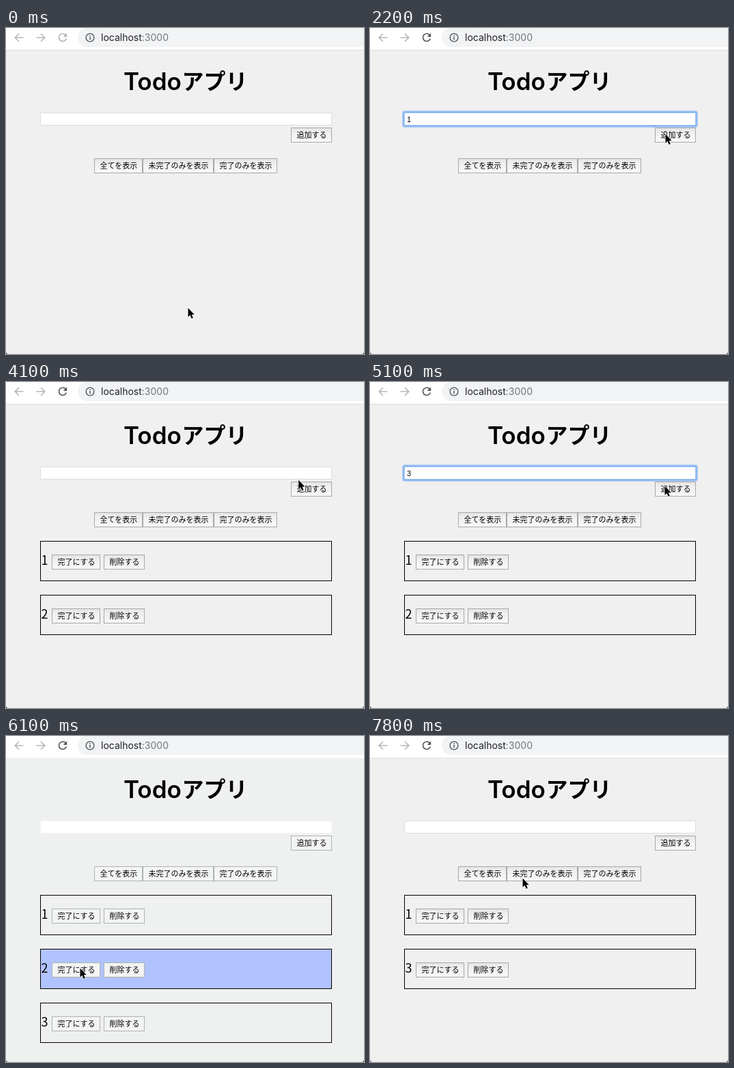
An HTML page that plays this animation: 524x478 px, repeating every 8 s.

```html
<!DOCTYPE html>
<html lang="ja">
<head>
<meta charset="utf-8">
<title>Todoアプリ</title>
<style>
  html, body { margin: 0; width: 100%; height: 100%; overflow: hidden; background: #f0f0f0; }
  svg { display: block; width: 524px; height: 478px; font-family: "Noto Sans CJK JP", "Noto Sans CJK", sans-serif; }
  text { white-space: pre; }
  .latin { font: 600 35px Inter, sans-serif; }
  .kana { font-size: 32px; font-weight: 700; }
  .url { font: 14px Inter, sans-serif; fill: #202124; }
  .port { fill: #74777b; }
  .button { font-size: 11px; }
  .field { font: 11px "Liberation Sans", Arial, sans-serif; }
  .label { font-size: 18px; }
  .icon { fill: none; stroke-width: 1.6; }
</style>
</head>
<body>
<svg id="stage" viewBox="0 0 524 478"></svg>
<script>
const LOOP = 8000, STEP = 100;
const stage = document.getElementById('stage');

// [time, x, y] of the pointer tip
const pointerPath = [
  [0, 266, 410], [200, 268, 385], [400, 288, 260], [600, 304, 165], [800, 307, 140],
  [1100, 307.5, 138], [1700, 307.5, 138], [2200, 432, 155], [2600, 432, 155], [2900, 425, 135],
  [3200, 425, 135], [3300, 429, 143], [3500, 432, 155], [3900, 433, 160], [4200, 425, 135],
  [4800, 425, 135], [5100, 431, 152], [5300, 432, 155], [5500, 432, 155], [5700, 325, 222],
  [5800, 227, 273], [6100, 108, 340], [6600, 105, 342], [6900, 122, 320], [7300, 218, 206],
  [7500, 221, 199], [7800, 223, 208]
];

const entries = [
  { label: '1', focus: 1200, typed: 1500, moved: 1700, added: 2300 },
  { label: '2', focus: 2800, typed: 3000, moved: 3300, added: 3600 },
  { label: '3', focus: 4200, typed: 4500, moved: 4800, added: 5200 }
];
const DONE_AT = 6400, FILTER_AT = 7500, RELOAD_READY = 100;
const ROW_TOP = 233, ROW_PITCH = 79, ROW_HEIGHT = 59;

function pointerAt(t) {
  const next = pointerPath.findIndex(p => p[0] > t);
  if (next < 0) return pointerPath.at(-1).slice(1);
  const [t0, x0, y0] = pointerPath[next - 1], [t1, x1, y1] = pointerPath[next];
  const k = (t - t0) / (t1 - t0);
  return [x0 + (x1 - x0) * k, y0 + (y1 - y0) * k];
}

const text = (cls, x, y, content) => `<text class="${cls}" x="${x}" y="${y}">${content}</text>`;
const box = (x, y, w, h, fill, stroke) =>
  `<rect x="${x + .5}" y="${y + .5}" width="${w - 1}" height="${h - 1}" fill="${fill}" stroke="${stroke}"/>`;

const buttonWidth = caption => caption.length * 11 + 16;

function button(x, y, caption, flat) {
  return box(x, y, buttonWidth(caption), 22, flat ? '#f3f4f4' : 'url(#shade)', flat ? '#b0b2b1' : '#a8a8a8') +
    text('button', x + 8.5, y + 15, caption);
}

function toolbar(t, flat) {
  const reload = t < RELOAD_READY ? '#b0b2b4' : '#505357';
  return `<rect width="524" height="32" fill="#fff"/>
    ${flat ? '' : '<rect y="32" width="524" height="1" fill="#dcdcdc"/>'}
    <rect x="105" y="0" width="460" height="28" rx="14" fill="#f1f3f4"/>
    <g class="icon" stroke="#b4b6b8">
      <path d="M25.5 14H13.5M19 8.2L13.2 14L19 19.8"/>
      <path d="M44.5 14H56.5M51 8.2L56.8 14L51 19.8"/>
    </g>
    <path class="icon" stroke="${reload}" d="M87.3 10.2A5.6 5.6 0 1 0 88.4 15.6"/>
    <path fill="${reload}" d="M89.2 7.6V13H83.8Z"/>
    <g class="icon" stroke="#55585c"><circle cx="123" cy="14" r="5.9" stroke-width="1.4"/>
      <path d="M123 13V17.3M123 10.5V12" stroke-width="1.5"/></g>
    ${text('url', 139, 19, 'localhost<tspan class="port">:3000</tspan>')}`;
}

function input(t, flat) {
  const active = entries.find(e => t >= e.focus && t < e.added + STEP);
  let out = '';
  if (active) {
    const fading = t < active.focus + STEP || t >= active.added;
    out += `<g fill="none" opacity="${fading ? .5 : 1}">
      <rect x="48.5" y="122.5" width="430" height="22" rx="2.5" stroke="#a9cbf5" stroke-width="3"/>
      <rect x="49.5" y="123.5" width="428" height="20" rx="1.5" stroke="#7fb0ee" stroke-width="1.6"/></g>`;
  }
  out += box(50, 124, 427, 19, '#fff', active ? '#a5c7f0' : flat ? '#f3f4f4' : '#dcdcdc');
  if (!active || t >= active.added) return out;
  const typed = t >= active.typed;
  if (typed) out += text('field', 54, 138, active.label);
  const since = t - (typed ? active.typed : active.focus);
  if (since % 1000 < 500) out += `<rect x="${typed ? 60 : 53}" y="128" width="1" height="12"/>`;
  return out;
}

function row(item, top, hovered, flat) {
  const toggle = item.done ? '未完了に戻す' : '完了にする';
  const strike = item.done ? `<rect x="51" y="${top + 28}" width="11" height="1.3"/>` : '';
  return box(50, top, 427, ROW_HEIGHT, hovered ? '#b1c3fe' : 'none', '#000') +
    text('label', 51.5, top + 35, item.label) + strike +
    button(67, top + 20, toggle, flat) +
    button(72 + buttonWidth(toggle), top + 20, '削除する', flat);
}

function pointer(t, x, y) {
  if (entries.some(e => t >= e.typed && t < e.moved)) return '';
  const overField = t >= 1100 && x > 50 && x < 477 && y >= 124 && y < 142;
  const shape = overField
    ? '<path d="M-3.5 -8Q0 -8 0 -5.5Q0 -8 3.5 -8M0 -5.5V5.5M-3.5 8Q0 8 0 5.5Q0 8 3.5 8M-2 2H2" fill="none" stroke="#222" stroke-width="1.3"/>'
    : '<path d="M.5 .5V13.8L3.5 11L5.6 16L7.8 15L5.8 10.2H9.8Z" stroke="#fff" stroke-width="1.4" paint-order="stroke" stroke-linejoin="round"/>';
  return `<g transform="translate(${x.toFixed(1)} ${y.toFixed(1)})">${shape}</g>`;
}

function scene(t) {
  const [x, y] = pointerAt(t);
  const items = entries
    .filter(e => t >= e.added)
    .map(e => ({ label: e.label, done: e.label === '2' && t >= DONE_AT }))
    .filter(item => t < FILTER_AT || !item.done);
  const rowTop = i => ROW_TOP + i * ROW_PITCH;
  const hovered = items.findIndex((_, i) =>
    x >= 50 && x < 477 && y >= rowTop(i) && y < rowTop(i) + ROW_HEIGHT);
  const flat = hovered >= 0; // controls lose their shading while a row is highlighted

  return `<defs><linearGradient id="shade" x2="0" y2="1">
      <stop stop-color="#e4e4e4"/><stop offset=".35" stop-color="#f0f0f0"/><stop offset="1" stop-color="#f8f8f8"/>
    </linearGradient></defs>
    <rect width="524" height="478" fill="${flat ? '#eff1f0' : '#f0f0f0'}"/>
    ${toolbar(t, flat)}
    ${text('latin', 172, 91, 'Todo')}
    ${text('kana', 257.5, 90, 'アプリ')}
    ${input(t, flat)}
    ${button(417, 146, '追加する', flat)}
    ${button(129, 191, '全てを表示', flat)}
    ${button(200, 191, '未完了のみを表示', flat)}
    ${button(304, 191, '完了のみを表示', flat)}
    ${items.map((item, i) => row(item, rowTop(i), i === hovered, flat)).join('')}
    <path d="M0 475V478H3Q0.5 477.5 0 475M524 475V478H521Q523.5 477.5 524 475" fill="#555"/>
    ${pointer(t, x, y)}`;
}

let start, shown;
function play(now) {
  start ??= now;
  const t = Math.floor(((now - start) % LOOP) / STEP) * STEP;
  if (t !== shown) {
    shown = t;
    stage.innerHTML = scene(t);
  }
  requestAnimationFrame(play);
}
stage.innerHTML = scene(0);
requestAnimationFrame(play);
</script>
</body>
</html>
```
